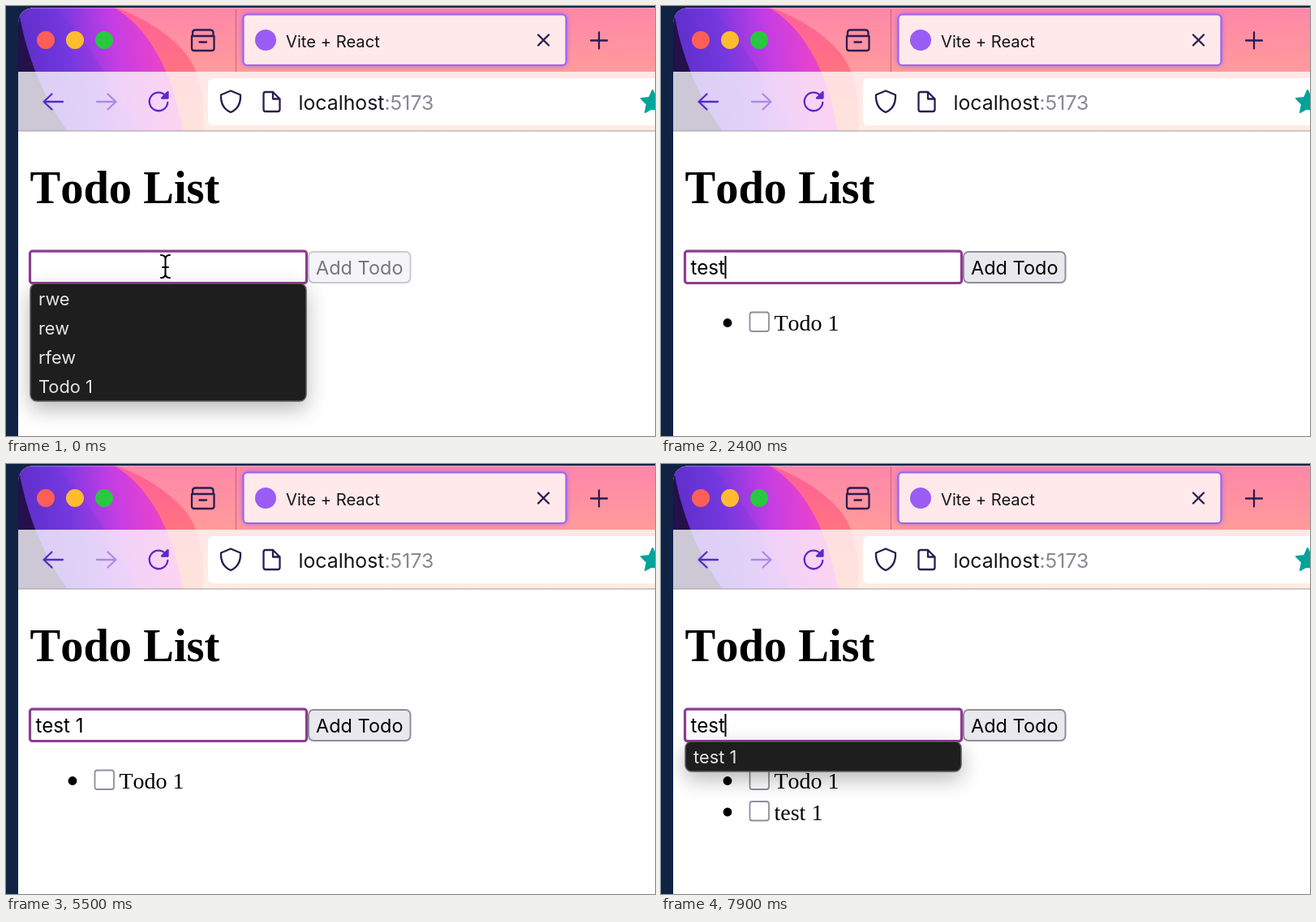
Recreate the animation shown at these times as an HTML page. Size 800 by 530 pixels, loop 8000 ms.

```html
<!DOCTYPE html>
<html lang="en">
<head>
<meta charset="utf-8">
<title>Todo List</title>
<style>
  html, body { margin: 0; width: 100%; height: 100%; overflow: hidden; background: #0f2345; }
  svg { display: block; width: 800px; height: 530px; }
  text { white-space: pre; }
  .ui { font-family: Inter, Roboto, sans-serif; }
  .page { font-family: "Liberation Serif", "Times New Roman", serif; font-size: 28px; font-kerning: none; }
  .page.title { font-size: 56.5px; font-weight: bold; }
  .line { fill: none; stroke-width: 2.3; stroke-linecap: round; stroke-linejoin: round; }
  .ink { stroke: #2b1d4e; }
  .violet { stroke: #592acb; }
  #button rect { fill: #e9e9ed; stroke: #8f8f9d; }
  #button.off rect { fill: #f5f5f7; stroke: #c9c9cf; }
  #button.off text { fill: #77777d; }
  #menu > rect { filter: drop-shadow(0 9px 13px rgba(0, 0, 0, .28)); }
</style>
</head>
<body>
<svg viewBox="0 0 800 530">
  <defs>
    <linearGradient id="sky" x1="0" y1="0" x2="0" y2="1">
      <stop offset="0" stop-color="#ff86a8"/>
      <stop offset=".5" stop-color="#ff9a9c"/>
      <stop offset="1" stop-color="#ffb08c"/>
    </linearGradient>
    <linearGradient id="orb" gradientUnits="userSpaceOnUse" x1="20" y1="70" x2="210" y2="40">
      <stop offset="0" stop-color="#5f2cc6"/>
      <stop offset=".3" stop-color="#7a38e0"/>
      <stop offset=".6" stop-color="#c43de4"/>
      <stop offset="1" stop-color="#fb45c0"/>
    </linearGradient>
    <linearGradient id="band" x1="0" y1="0" x2="0" y2="1">
      <stop offset="0" stop-color="#ff5f9c"/>
      <stop offset="1" stop-color="#ff8664"/>
    </linearGradient>
    <clipPath id="window"><path d="M15 530V24Q15 2 37 2H800V530Z"/></clipPath>
  </defs>

  <rect width="800" height="530" fill="#0f2345"/>
  <g clip-path="url(#window)">
    <rect x="15" width="785" height="530" fill="#fff"/>

    <!-- browser theme -->
    <rect x="15" y="2" width="785" height="152" fill="url(#sky)"/>
    <path d="M15 2H135C185 20 225 52 234 81Q246 115 243 154H15Z" fill="url(#band)"/>
    <path d="M15 2H133C172 24 205 75 218 154H15Z" fill="url(#orb)"/>
    <path d="M15 2H60C90 30 135 95 160 154H15Z" fill="#5b38d8" opacity=".2"/>
    <path d="M15 2C24 60 47 115 76 154H15Z" fill="#24104a"/>
    <rect x="15" y="81" width="785" height="73" fill="#fff" opacity=".77"/>
    <path d="M15 2.7H800" stroke="#fff" opacity=".3"/>
    <path d="M283.5 4V81" stroke="#a04a72" opacity=".6"/>
    <path d="M15 154H800" stroke="#a3989d"/>

    <!-- tab strip -->
    <circle cx="49" cy="42" r="11" fill="#ff5f57"/>
    <circle cx="85" cy="42" r="11" fill="#febc2e"/>
    <circle cx="121" cy="42" r="11" fill="#28c840"/>
    <g class="line ink">
      <path d="M230 36V33Q230 29.500 233.500 29.500H252Q255.500 29.500 255.500 33V36M229 37H256.500V52Q256.500 55 253.500 55H232Q229 55 229 52ZM238.500 44.500H247"/>
      <path d="M721 42.500H741M731 32.500V52.500"/>
    </g>
    <rect x="292.500" y="10.500" width="398" height="62.500" rx="5" fill="#ffe9ea" stroke="#9a64f3" stroke-width="2.200"
          style="filter: drop-shadow(0 0 3px #9059ffaa)"/>
    <circle cx="320" cy="42" r="13" fill="#9a5cf5"/>
    <text class="ui" x="345" y="50.500" font-size="20.200" fill="#15141a">Vite + React</text>
    <path class="line ink" d="M656 35.500L669 48.500M669 35.500L656 48.500"/>

    <!-- toolbar -->
    <rect x="249" y="89" width="570" height="58" rx="6" fill="#fff"/>
    <g class="line violet">
      <path id="arrow" d="M70 118H47M56.500 108.500L46.500 118L56.500 127.500"/>
      <use href="#arrow" transform="matrix(-1 0 0 1 182 0)" opacity=".42"/>
      <path d="M197 111A11.300 11.300 0 1 0 199.300 119"/>
      <path d="M199.500 106V113.500H192Z" fill="#592acb"/>
    </g>
    <g class="line ink">
      <path d="M277 104.500L289 109.500C289.500 120 285 127.500 277 131C269 127.500 264.500 120 265 109.500Z"/>
      <path d="M329 106H320Q317.500 106 317.500 108.500V127.500Q317.500 130 320 130H335Q337.500 130 337.500 127.500V114.500ZM329 106V114.500H337.500"/>
    </g>
    <text class="ui" x="360.500" y="127.500" font-size="24.800" fill="#15141a">localhost<tspan fill="#8b8794">:5173</tspan></text>
    <path d="M797 104L801 113L811 114L803 121L806 131L797 126L788 131L790 121L783 114L793 113Z"
          fill="#00a49a" stroke="#00a49a" stroke-width="2" stroke-linejoin="round"/>

    <!-- page -->
    <text class="page title" x="29.500" y="243">Todo List</text>
    <g id="list"></g>
    <g id="button">
      <rect x="373" y="303" width="125.500" height="38" rx="6" stroke-width="2"/>
      <text class="ui" x="382" y="331" font-size="23.500">Add Todo</text>
    </g>
    <rect x="29.500" y="302.200" width="341" height="39.300" rx="3" fill="#fff" stroke="#8d3c92" stroke-width="3.200"/>
    <text id="field" class="ui" x="36.500" y="331" font-size="24.200"></text>
    <rect id="caret" y="308" width="2" height="28"/>
    <g id="menu">
      <rect x="30" y="342" width="340" rx="8" fill="#1e1e1e" stroke="#5c5c5c" stroke-width="1.500"/>
      <g id="options" class="ui" font-size="21.800" fill="#e6e6e6"></g>
    </g>
    <g id="pointer" fill="none" stroke-linecap="round">
      <path id="beam" d="M191 307Q196.500 307 196.500 312V330Q196.500 335 191 335M202 307Q196.500 307 196.500 312M202 335Q196.500 335 196.500 330M193 322H200"/>
    </g>
    <g id="key">
      <rect x="312" y="355" width="176" height="129" rx="34" fill="#1d1d1d"/>
      <path d="M404 392H422Q430 392 430 400V417Q430 425 422 425H371M387 407.500L369 425L387 443"
            fill="none" stroke="#fff" stroke-width="7.500" stroke-linecap="round" stroke-linejoin="round"/>
    </g>
  </g>
</svg>
<style>
  #beam { stroke: #000; stroke-width: 2; }
</style>
<script>
const LOOP = 8000, BLINK = 500, ROW = 36;
const KEY = { show: 5800, fade: 6600, gone: 7000 };

// Each step: start time, field text, suggestions
const steps = [
  [0, "", ["rwe", "rew", "rfew", "Todo 1"]],
  [1500, "t", ["Todo 1"]],
  [1800, "te", []],
  [2000, "tes", []],
  [2200, "test", []],
  [2800, "test ", []],
  [3900, "test 1", []],
  [4200, "test 12", []],
  [5000, "test 1", []],
  [6000, "", []],
  [7400, "t", ["Todo 1", "test 1"]],
  [7600, "te", ["test 1"]],
  [7700, "tes", ["test 1"]],
  [7800, "test", ["test 1"]],
];
const SUBMIT = 6000;

const $ = id => document.getElementById(id);
const show = (node, on) => { node.style.display = on ? "" : "none"; };

$("list").innerHTML = ["Todo 1", "test 1"].map((label, i) => `
  <g transform="translate(0 ${i * 38.5})">
    <circle cx="82" cy="390.500" r="5.400"/>
    <rect x="109.500" y="377.500" width="23.500" height="23.500" rx="3" fill="#fff" stroke="#8f8f9d" stroke-width="1.800"/>
    <text class="page" x="139.500" y="400">${label}</text>
  </g>`).join("");
const newItem = $("list").lastElementChild;
const menuBox = $("menu").querySelector("rect");

let current;
function applyStep(step) {
  current = step;
  const [, text, options] = step;
  $("field").textContent = text;
  $("caret").setAttribute("x", 36 + (text ? $("field").getComputedTextLength() : 0));
  $("button").classList.toggle("off", !text);
  show($("menu"), options.length);
  menuBox.setAttribute("height", options.length * ROW + 1);
  $("options").innerHTML = options.map((label, i) =>
    `<text x="40" y="${368.5 + i * ROW}">${label}</text>`).join("");
}

function render(time) {
  const step = steps.findLast(([start]) => time >= start);
  if (step !== current) applyStep(step);
  const sinceKey = time - step[0] + (step === steps[0] ? BLINK : 0);
  show($("caret"), Math.floor(sinceKey / BLINK) % 2 === 0);
  show($("pointer"), step === steps[0]);
  show(newItem, time >= SUBMIT);
  const fade = (KEY.gone - time) / (KEY.gone - KEY.fade);
  $("key").style.opacity = time < KEY.show ? 0 : Math.max(0, Math.min(1, fade));
}

const start = performance.now();
function tick() {
  render((performance.now() - start) % LOOP);
  requestAnimationFrame(tick);
}
tick();
</script>
</body>
</html>
```
